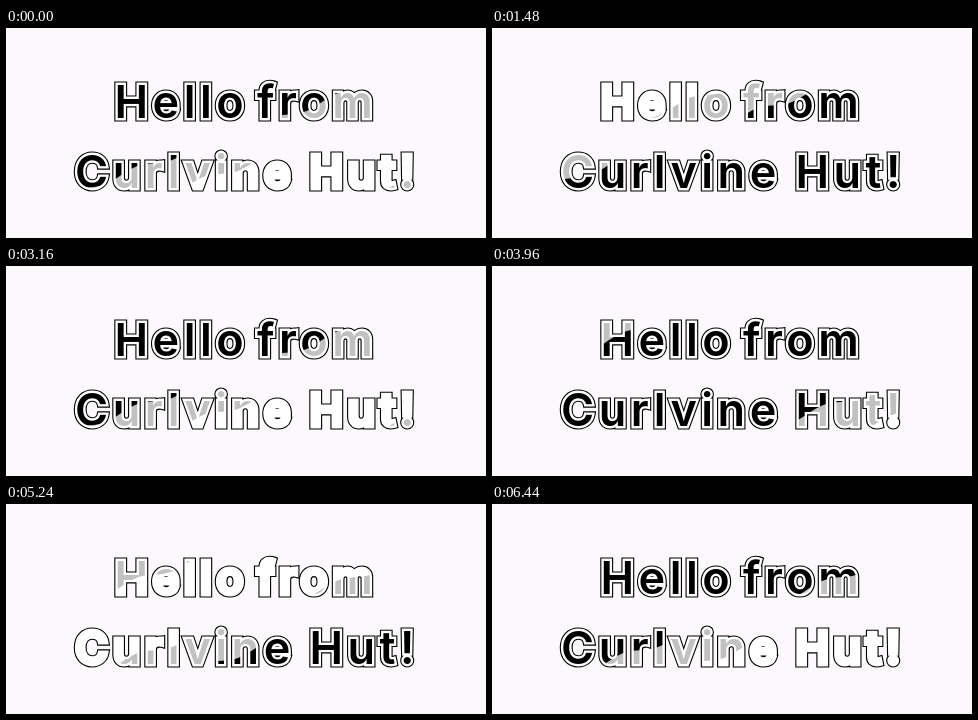
Recreate the animation shown at these times as an HTML page with a canvas. Size 480 by 210 pixels, loop 6480 ms.

```html
<!DOCTYPE html>
<html lang="en">
<head>
<meta charset="utf-8">
<title>Hello from Curlvine Hut!</title>
<style>
  html, body { margin: 0; width: 100%; height: 100%; overflow: hidden; background: #fdf8fc; }
  canvas { display: block; width: 480px; height: 210px; }
</style>
</head>
<body>
<canvas id="stage" role="img" aria-label="Hello from Curlvine Hut!"></canvas>
<script>
const W = 480, H = 210;
const LOOP = 6480, STEP = 40;
const CYCLE = 3160;      // time for one band to replace the next
const SPAN = 800;        // distance between bands
const BAND = 400;        // length of the black band
const EDGE = 96;         // grey on either side of it
const START = 520;       // leading edge at time zero
const SLOPE = 2.75;

const words = [
  ['Hello', 108.5, 89.5], ['from', 251, 89.5],
  ['Curlvine', 69, 160], ['Hut!', 303.5, 160]
];

const scale = Math.max(1, window.devicePixelRatio || 1);

function layer(canvas) {
  canvas.width = W * scale;
  canvas.height = H * scale;
  const c = canvas.getContext('2d');
  c.scale(scale, scale);
  c.font = '600 45px Inter, sans-serif';
  c.letterSpacing = '4.5px';
  c.lineJoin = 'miter';
  c.miterLimit = 3;
  return c;
}

const stage = layer(document.getElementById('stage'));
const base = layer(document.createElement('canvas'));
const mask = layer(document.createElement('canvas'));
const ink = layer(document.createElement('canvas'));

function outline(c, color, width) {
  c.strokeStyle = color;
  c.lineWidth = width;
  for (const [text, x, y] of words) c.strokeText(text, x, y);
}

function fill(c, color) {
  c.fillStyle = color;
  for (const [text, x, y] of words) c.fillText(text, x, y);
}

base.fillStyle = '#fdf8fc';
base.fillRect(0, 0, W, H);
outline(base, '#000', 7);
outline(base, '#fff', 4.8);
fill(base, '#fff');
fill(mask, '#000');

// Height of a slanted, gently rippled edge at x
function edgeY(s, x) {
  return (s - x - 9 * Math.sin((x - 115) * 0.094)) / SLOPE;
}

function band(from, to, color) {
  ink.beginPath();
  for (let x = 0; x <= W; x += 4) ink.lineTo(x, edgeY(from, x));
  for (let x = W; x >= 0; x -= 4) ink.lineTo(x, edgeY(to, x));
  ink.closePath();
  ink.fillStyle = color;
  ink.fill();
}

function draw(t) {
  const lead = START + SPAN * t / CYCLE;
  ink.globalCompositeOperation = 'source-over';
  ink.clearRect(0, 0, W, H);
  for (let n = -3; n <= 1; n++) {
    const head = lead + n * SPAN, tail = head - BAND;
    band(tail - EDGE, head + EDGE, '#c1c1c1');
    band(tail, head, '#000');
  }
  ink.globalCompositeOperation = 'destination-in';
  ink.drawImage(mask.canvas, 0, 0, W, H);
  stage.drawImage(base.canvas, 0, 0, W, H);
  stage.drawImage(ink.canvas, 0, 0, W, H);
}

function frame() {
  const t = performance.now() % LOOP;
  draw(Math.floor(t / STEP) * STEP);
  requestAnimationFrame(frame);
}

frame();
</script>
</body>
</html>
```
